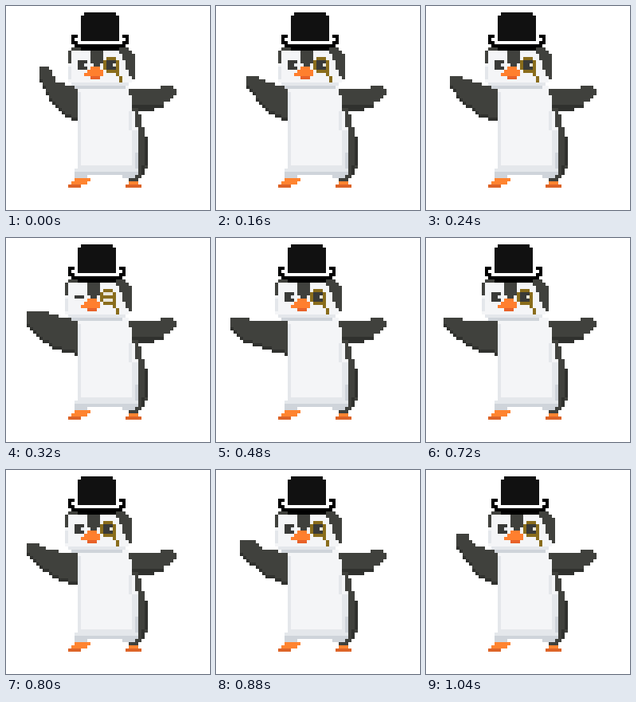
These frames come from a looping animation (256x256 px, 1120 ms). An HTML page with a canvas:

```html
<!DOCTYPE html>
<html lang="en">
<head>
<meta charset="utf-8">
<title>Waving penguin</title>
<style>
  html, body { margin: 0; width: 100%; height: 100%; overflow: hidden; background: #fff; }
  canvas { display: block; width: 256px; height: 256px; }
</style>
</head>
<body>
<canvas id="stage" width="256" height="256"></canvas>
<script>
const ctx = document.getElementById('stage').getContext('2d');
const CELL = 4, LEFT = 2, STEP = 80, COUNT = 14;
const C = {
  coat: '#40413d', edge: '#30312e', white: '#f4f5f7', pale: '#e4e7eb', grey: '#cfd4da',
  hat: '#111111', black: '#000000', brim: '#ffffff', eye: '#393a38', gold: '#8a6d1c',
  lens: '#e9e6da', beak: '#ff7f2e', beakLow: '#e8622a', foot: '#ff8430', footLow: '#dd6428'
};

// Wing outline in pixels: upper bend, tip top (2), tip bottom, lower bends (2)
const wing = {
  0:  [64, 94, 54, 76, 42, 76, 42, 90, 54, 116, 72, 136],
  2:  [62, 94, 50, 88, 38, 88, 38, 102, 52, 118, 70, 136],
  4:  [62, 97, 46, 92, 26, 92, 26, 108, 42, 126, 62, 140],
  6:  [50, 104, 34, 100, 18, 100, 18, 114, 36, 130, 62, 140],
  7:  [50, 105, 32, 102, 14, 104, 14, 116, 34, 132, 62, 142],
  9:  [50, 103, 42, 100, 22, 100, 22, 110, 40, 127, 62, 141],
  11: [58, 99, 46, 88, 30, 88, 30, 104, 46, 120, 64, 134],
  13: [62, 95, 52, 80, 38, 80, 38, 96, 52, 116, 66, 134]
};
const wingKeys = Object.keys(wing).map(Number);

let shift = 0; // sideways head offset in cells

function rect(color, col, row, w = 1, h = 1) {
  ctx.fillStyle = color;
  ctx.fillRect(LEFT + (col + shift) * CELL, row * CELL, w * CELL, h * CELL);
}

function inside(pts, x, y) {
  let hit = false;
  for (let i = 0, j = pts.length - 2; i < pts.length; j = i, i += 2) {
    const [ax, ay, bx, by] = [pts[i], pts[i + 1], pts[j], pts[j + 1]];
    if ((ay > y) !== (by > y) && x < (bx - ax) * (y - ay) / (by - ay) + ax) hit = !hit;
  }
  return hit;
}

// Fills every cell whose centre lies in the outline, with an optional lower rim
function shape(color, pts, rim = color) {
  for (let r = 0; r < 64; r++) {
    for (let c = 0; c < 64; c++) {
      if (!inside(pts, c + .5, r + .5)) continue;
      rect(inside(pts, c + .5, r + 1.5) ? color : rim, c, r);
    }
  }
}

function wingAt(n) {
  const b = wingKeys.find(k => k >= n);
  const a = wingKeys.filter(k => k <= n).pop();
  const u = a === b ? 0 : (n - a) / (b - a);
  return wing[a].map((v, i) => {
    const p = v + (wing[b][i] - v) * u;
    return i % 2 ? p / CELL : (p - LEFT) / CELL;
  });
}

function body(n) {
  shape(C.coat, [23, 26, ...wingAt(n), 23, 37], C.edge);

  // right wing
  rect(C.coat, 48, 25, 4);
  rect(C.coat, 38, 26, 15, 2);
  rect(C.coat, 38, 28, 14);
  rect(C.coat, 38, 29, 13);
  rect(C.coat, 38, 30, 11);
  rect(C.edge, 39, 31, 10);
  rect(C.edge, 39, 32, 7);

  // back
  shape(C.coat, [36, 32, 41, 32, 42, 36, 43, 40, 44, 42, 44, 50, 43, 53, 41, 55, 38, 55]);
  rect(C.edge, 43, 41, 1, 9);
  rect(C.edge, 42, 50, 1, 3);

  // feet
  rect(C.foot, 21, 54, 5);
  rect(C.foot, 20, 55, 5);
  rect(C.footLow, 19, 56, 4);
  rect(C.foot, 38, 55, 3);
  rect(C.footLow, 37, 56, 5);

  // belly
  shape(C.white, [22, 25, 38, 25, 39, 30, 40, 35, 41, 41, 41, 51, 22, 51]);
  rect(C.pale, 22, 27, 1, 24);
  rect(C.pale, 38, 33, 1, 6);
  rect(C.pale, 39, 39, 2, 12);
  rect(C.grey, 40, 46, 1, 5);
  rect(C.pale, 22, 50, 18);
  rect(C.pale, 21, 51, 20);
  rect(C.grey, 21, 52, 20);
  rect(C.grey, 21, 53, 4);
  rect(C.grey, 36, 53, 4);
}

function face(shut) {
  shape(C.coat, [21, 13, 38, 13, 40, 15, 40, 23, 38, 25, 36, 26, 22, 26, 20, 24, 19, 22, 19, 15]);
  shape(C.white, [21, 14, 26, 14, 26, 18, 30, 18, 30, 14, 35, 14, 37, 18, 38, 21, 39, 23,
    38, 25, 36, 26, 22, 26, 20, 25, 19, 23, 19, 18, 20, 18, 20, 15]);
  rect(C.pale, 19, 19, 1, 4);
  rect(C.pale, 20, 24, 18);
  rect(C.grey, 21, 25, 16);
  rect(C.coat, 27, 18, 2);

  if (shut) {
    rect(C.eye, 22, 18, 3);
  } else {
    rect(C.eye, 22, 17, 3, 3);
    rect(C.pale, 24, 18);
  }

  rect(C.beak, 26, 19, 3);
  rect(C.beak, 25, 20, 5);
  rect(C.beak, 24, 21, 6);
  rect(C.beakLow, 26, 22, 3);

  // monocle
  rect(C.lens, 31, 17, 3, 3);
  if (shut) {
    rect(C.gold, 31, 18, 3);
  } else {
    rect(C.eye, 31, 17, 2, 3);
    rect(C.eye, 33, 17);
    rect(C.eye, 33, 19);
  }
  rect(C.gold, 31, 16, 3);
  rect(C.gold, 30, 17, 1, 3);
  rect(C.gold, 34, 17, 1, 5);
  rect(C.gold, 31, 20, 3);
  rect(C.gold, 35, 22, 1, 2);
}

function hat() {
  rect(C.black, 20, 9, 18, 2);
  rect(C.black, 21, 11, 16, 2);
  rect(C.black, 23, 13, 12);
  rect(C.black, 20, 11);
  rect(C.black, 37, 11);
  rect(C.brim, 22, 9);
  rect(C.brim, 35, 9);
  rect(C.brim, 21, 10, 2);
  rect(C.brim, 35, 10, 2);
  rect(C.brim, 22, 11, 14);
  rect(C.hat, 24, 2, 10);
  rect(C.hat, 23, 3, 12, 8);
}

function headShift(n) {
  if (n < 3 || n > 12) return 0;
  return n > 6 && n < 10 ? -2 : -1;
}

function draw(n) {
  ctx.fillStyle = '#fff';
  ctx.fillRect(0, 0, 256, 256);
  shift = 0;
  body(n);
  shift = headShift(n);
  face(n === 4);
  hat();
}

let last = -1;
function tick() {
  const n = Math.floor(performance.now() / STEP) % COUNT;
  if (n !== last) draw(last = n);
  requestAnimationFrame(tick);
}
tick();
</script>
</body>
</html>
```
